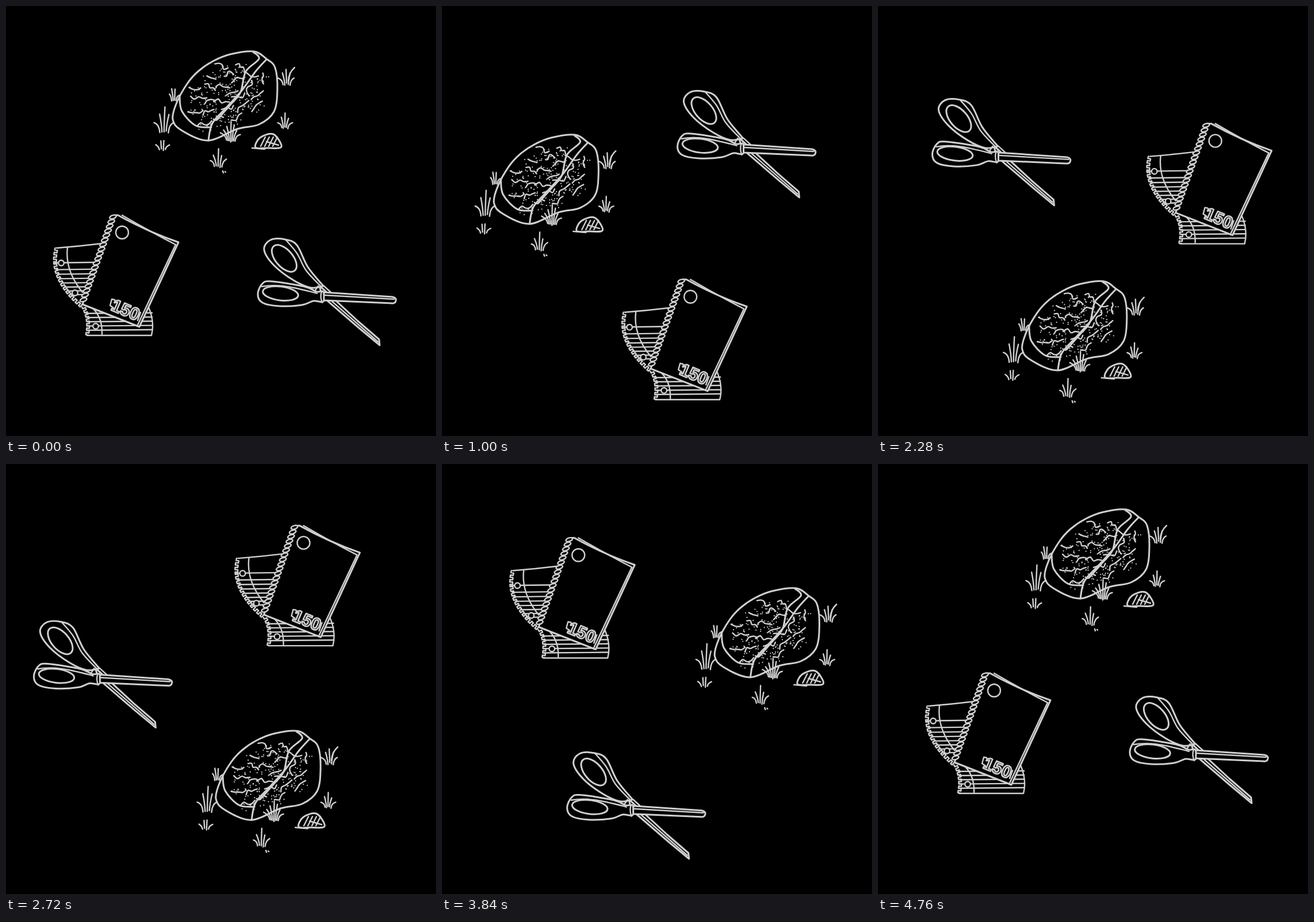
These frames come from a looping animation (748 px wide and 748 px high, 4.8 s). An HTML page:

```html
<!DOCTYPE html>
<html lang="en">
<head>
<meta charset="utf-8">
<title>Rock, paper, scissors</title>
<style>
  html, body { margin: 0; width: 100%; height: 100%; overflow: hidden; background: #000; }
  svg { display: block; width: 100vw; height: 100vh; }
  g { fill: none; stroke: #d0d0d0; stroke-width: 3; stroke-linecap: round; stroke-linejoin: round; }
  .fine { stroke-width: 2.4; }
  .solid { fill: #000; }
  .dot { fill: #d0d0d0; stroke: none; }
  text { font: bold 30px "Liberation Sans", sans-serif; stroke-width: 2.6; }
</style>
</head>
<body>
<svg viewBox="0 0 748 748">
  <g id="rock"></g>
  <g id="paper"></g>
  <g id="scissors"></g>
</svg>
<script>
const NS = "http://www.w3.org/2000/svg";

function add(g, tag, attrs) {
  const el = document.createElementNS(NS, tag);
  for (const key in attrs) el.setAttribute(key, attrs[key]);
  return g.appendChild(el);
}

const path = (g, d, cls = "") => add(g, "path", { d, class: cls });
const circle = (g, cx, cy, r, cls = "solid fine") => add(g, "circle", { cx, cy, r, class: cls });
const oval = (g, cx, cy, rx, ry, deg, cls = "solid") =>
  add(g, "ellipse", { cx, cy, rx, ry, class: cls, transform: `rotate(${deg} ${cx} ${cy})` });

// Smooth path through "x,y x,y ..." points
function smooth(text, closed) {
  const p = text.trim().split(/\s+/).map(s => s.split(",").map(Number));
  const n = p.length;
  const at = i => closed ? p[(i + n) % n] : p[Math.max(0, Math.min(n - 1, i))];
  let d = "M" + p[0];
  for (let i = 0; i < (closed ? n : n - 1); i++) {
    const [a, b, c, e] = [at(i - 1), at(i), at(i + 1), at(i + 2)];
    const c1 = b.map((v, k) => v + (c[k] - a[k]) / 6);
    const c2 = c.map((v, k) => v - (e[k] - b[k]) / 6);
    d += `C${c1} ${c2} ${c}`;
  }
  return d + (closed ? "Z" : "");
}

const curve = (g, pts, cls) => path(g, smooth(pts), cls);
const loop = (g, pts) => path(g, smooth(pts, true), "solid");

let seed = 41;
const rnd = () => (seed = (seed * 16807) % 2147483647) / 2147483647;
const spread = size => (rnd() - 0.5) * size;

// Square teeth along an edge
function torn(edge, pitch = 8, depth = 2.4) {
  const length = edge.getTotalLength();
  const point = s => edge.getPointAtLength(Math.max(0, Math.min(length, s)));
  let d = "";
  for (let s = 0, side = 1; s < length; s += pitch / 2, side = -side) {
    for (const q of [s, s + pitch / 2]) {
      const a = point(q - 1), b = point(q + 1);
      const k = depth * side / Math.hypot(b.x - a.x, b.y - a.y);
      d += `${d ? "L" : "M"}${(a.x + b.x) / 2 - (b.y - a.y) * k} ${(a.y + b.y) / 2 + (b.x - a.x) * k}`;
    }
  }
  edge.setAttribute("d", d);
}

// Ruled lines running right from a sheet's left edge
function ruled(g, edge, from, step, count, right) {
  for (let i = 0; i < count; i++) {
    const p = edge.getPointAtLength(from + i * step);
    path(g, `M${p.x} ${p.y}L${right} ${p.y - 1}`, "fine");
  }
}

// Blades fanning out of one root, tallest in the middle
function tuft(g, x, y, w, h, blades = 5) {
  for (let i = 0; i < blades; i++) {
    const k = 2 * i / (blades - 1) - 1;
    const tipX = x + k * w / 2 + spread(3);
    const tipY = y - h * (1 - 0.6 * Math.abs(k)) + spread(4);
    path(g, `M${x + k * w * 0.22} ${y - spread(4)}Q${x + k * w * 0.25} ${y - h * 0.3} ${tipX} ${tipY}`, "fine");
  }
}

// A wavy wrinkle with stipple around it
function wrinkle(g, x, y, angle, length) {
  const cos = Math.cos(angle), sin = Math.sin(angle);
  let pts = "";
  for (let s = -0.5; s <= 0.5; s += 0.25) {
    const bend = spread(8);
    pts += `${x + cos * s * length - sin * bend},${y + sin * s * length + cos * bend} `;
  }
  curve(g, pts, "fine");
  for (let i = 0; i < 9; i++) circle(g, x + spread(30), y + 5 + spread(18), 1.1, "dot");
}

function drawRock(g) {
  loop(g, `335,113 360,96 390,84 431,79 453,92 468,107 472,146 466,184 440,206
    402,214 351,234 305,216 290,197 297,168 316,134`);
  curve(g, "302,157 306,183 330,208 357,211");
  curve(g, "453,93 434,114 411,146 384,176 359,204 352,234");
  curve(g, "430,80 440,92 417,114 408,150 391,171 367,198");

  // Level wrinkles on the left face, steep ones right of the crack
  const wrinkles = 25, tilt = -0.5;
  for (let i = 0; i < wrinkles; i++) {
    const r = 0.82 * Math.sqrt((i + 0.5) / wrinkles), a = i * 2.4;
    const u = 90 * r * Math.cos(a), v = 60 * r * Math.sin(a);
    const x = 383 + u * Math.cos(tilt) - v * Math.sin(tilt);
    const y = 153 + u * Math.sin(tilt) + v * Math.cos(tilt);
    const right = (x - 352) * 1.4 + (y - 232) > 0;
    wrinkle(g, x, y, (right ? 2.1 : 0.1) + spread(0.9), 16 + rnd() * 14);
  }

  // Pebble
  loop(g, "434,246 442,229 465,223 479,245 455,247");
  for (let x = 446; x < 472; x += 7) path(g, `M${x + 5} 228L${x - 3} 244`, "fine");
  path(g, "M428 247L450 249M453 236L474 242", "fine");

  // Grass
  tuft(g, 275, 219, 34, 44);
  tuft(g, 292, 164, 18, 24, 4);
  tuft(g, 272, 250, 24, 18, 4);
  tuft(g, 369, 279, 30, 29);
  tuft(g, 391, 235, 34, 33, 7);
  tuft(g, 488, 136, 28, 26);
  tuft(g, 485, 212, 24, 24);
  path(g, "M502 107Q492 116 491 130M377 287l1 3M381 288l1 1", "fine");
}

function drawPaper(g) {
  // Loose sheets
  const upper = path(g, "M88 421Q74 472 131 522", "fine");
  const lower = path(g, "M134 522Q147 545 141 573", "fine");
  ruled(g, upper, 26, 0, 1, 165);
  ruled(g, upper, 38, 8.4, 7, 165);
  ruled(g, lower, 14, 7.4, 5, 254);
  torn(upper);
  torn(lower);
  path(g, "M88 421Q127 418 168 413M141 573H253Q259 550 248 524", "fine");
  path(g, "M107 420Q102 460 133 498M148 523Q168 540 167 571", "fine");
  circle(g, 96, 447, 4.8);
  circle(g, 120, 499, 4.8);
  circle(g, 156, 557, 4.8);

  // Cover
  path(g, "M195 364Q245 392 300 411L232 558L133 519L188 364Z", "solid");
  path(g, "M202 364Q250 392 295 415L228 557", "fine");
  circle(g, 202, 394, 11);

  // Spiral binding
  for (let i = 0; i < 19; i++) oval(g, 186 - i * 2.85, 367 + i * 8, 6, 3, -18, "solid fine");

  // Sheet count
  const label = add(g, "text", { class: "solid", "text-anchor": "middle", transform: "translate(204 538) rotate(23)" });
  label.textContent = "150";
  path(g, "M189 511l-5 -1l-3 11l6 4M234 533l-5 14", "fine");
}

function drawScissors(g) {
  // Blade under the pivot
  path(g, "M550 505L615 561L650 590L649 580L612 548L545 486Z", "solid");
  path(g, "M565 512L647 584", "fine");
  // Upper handle
  curve(g, "552,487 525,454 506,416 485,406 460,407 449,424 466,451 500,477 530,490 552,487", "solid");
  curve(g, "486,406 506,430 522,460 547,487", "fine");
  oval(g, 484, 439, 28, 15, 49);
  // Lower handle
  loop(g, "438,501 446,483 462,479 519,488 540,497 552,497 552,514 535,513 515,520 475,522 446,516");
  path(g, "M445 488Q470 483 505 491T541 500M549 497Q546 506 550 516", "fine");
  oval(g, 477.5, 500, 31, 12, 7);
  // Pivot
  path(g, "M530 491L537 496L543 487M553 487L565 498M547 488L556 497", "fine");
  // Blade over the pivot
  path(g, "M553 498L672 506Q680 508 678 513Q677 518 670 517L553 512Z", "solid");
  path(g, "M554 503L675 510", "fine");
}

// Each part stays upright while circling its own centre; cx, cy are relative to its start
const parts = [
  { id: "rock", draw: drawRock, cx: -6.4, cy: 201.2 },
  { id: "paper", draw: drawPaper, cx: 187.1, cy: -92.4 },
  { id: "scissors", draw: drawScissors, cx: -179.8, cy: -110.2 },
];
for (const part of parts) {
  part.el = document.getElementById(part.id);
  part.draw(part.el);
}

const TICK = 40, TICKS = 120;
const start = performance.now();

function render(now) {
  const tick = Math.floor(Math.max(0, now - start) / TICK) % TICKS;
  const angle = -2 * Math.PI * tick / (TICKS - 1);
  const cos = Math.cos(angle), sin = Math.sin(angle);
  for (const { el, cx, cy } of parts) {
    const x = cx - cx * cos + cy * sin;
    const y = cy - cx * sin - cy * cos;
    el.setAttribute("transform", `translate(${x.toFixed(2)} ${y.toFixed(2)})`);
  }
  requestAnimationFrame(render);
}
render(start);
</script>
</body>
</html>
```
